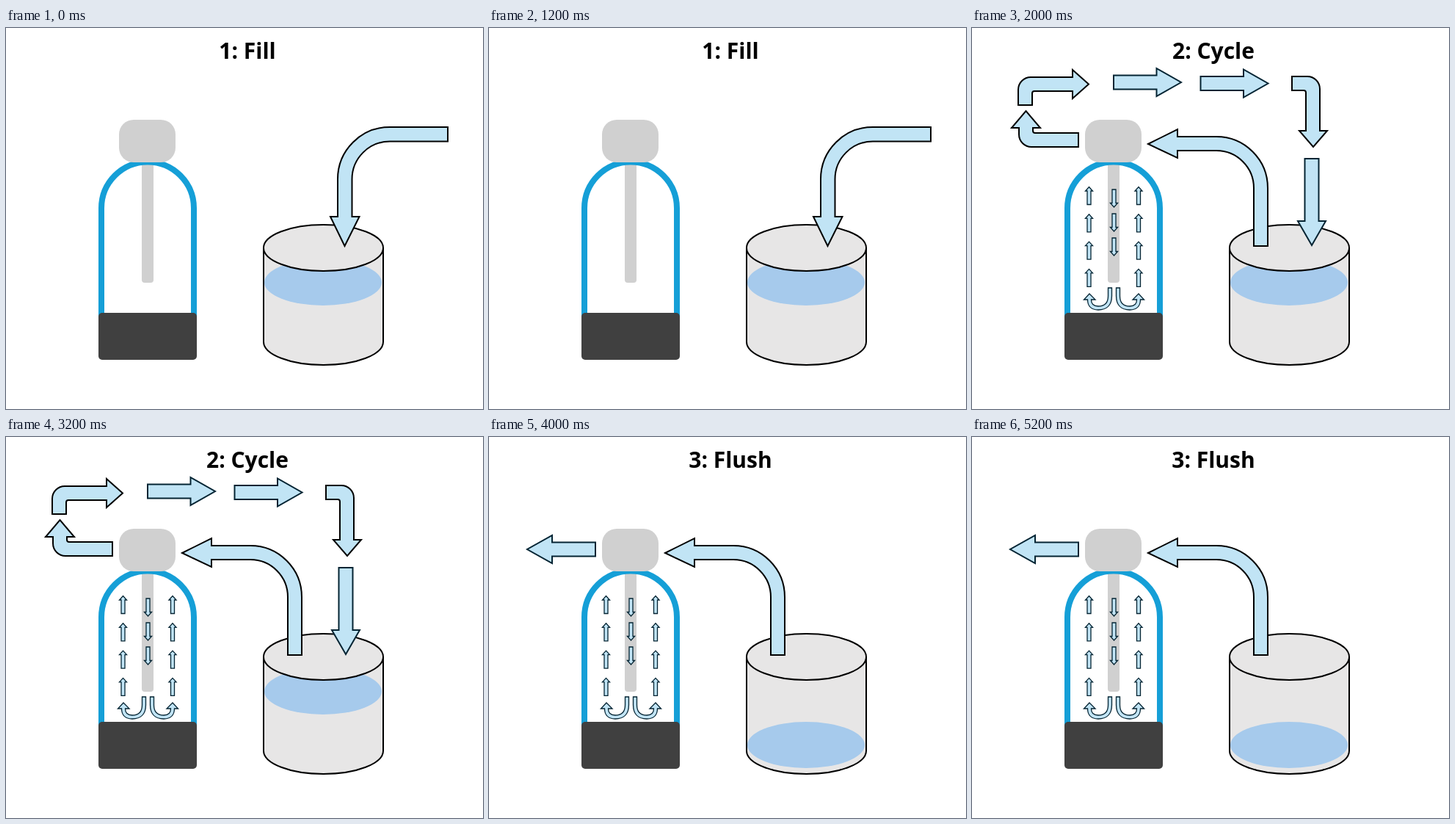
Write an HTML page that moves like this. It is 650x519 px and loops after 6 s.

```html
<!DOCTYPE html>
<html lang="en">
<head>
<meta charset="utf-8">
<style>
  html, body { margin: 0; width: 100%; height: 100%; overflow: hidden; background: #fff; }
  svg { display: block; width: 100%; height: 100%; }
  text { font: bold 30px "Open Sans", "Noto Sans", sans-serif; text-anchor: middle; }
  .arrow { fill: #c1e4f5; stroke: #000; stroke-width: 2; }
  .straight { stroke: #042433; }
  .small { stroke: #042433; stroke-width: 1.3; }
</style>
</head>
<body>
<svg viewBox="0 0 650 519">
  <defs>
    <path id="right" d="M193 64.5H251.500V55L285 74 251.500 93V83.500H193Z"/>
    <path id="up" d="M159.500 216.500L164.500 222H162V240.500H157V222H154.500Z"/>
    <path id="down" d="M191 220H196V238.500H198.500L193.500 244 188.500 238.500H191Z"/>
    <path id="turn" d="M190.500 354V365C190.500 378 183 384 172 384C163 384 157.500 379 157.500 370H152.500L160 362 168 370H162.500C162.500 376 166 379 172 379C180 379 185.500 375 185.500 365V354Z"/>
  </defs>

  <text id="title" x="329" y="42"></text>

  <!-- Bottle -->
  <rect x="185" y="180" width="16" height="167" rx="4" fill="#d0d0d0"/>
  <path d="M130 395V245.500A63 63 0 0 1 256 245.500V395" fill="none" stroke="#159fd7" stroke-width="8"/>
  <rect x="154" y="125" width="77" height="58" rx="20" fill="#d0d0d0"/>
  <rect x="126" y="388" width="134" height="64" rx="5" fill="#404040"/>

  <!-- Tank -->
  <g fill="#e7e6e6" stroke="#000" stroke-width="2">
    <path d="M351 299.500V427.500A81.500 31.500 0 0 0 514 427.500V299.500"/>
    <ellipse id="water" cx="432" rx="80" ry="31.500" fill="#a6caec" stroke="none"/>
    <ellipse cx="432.500" cy="299.500" rx="81.500" ry="31.500"/>
  </g>

  <g class="arrow" data-steps="0">
    <path d="M602 135H523A71 71 0 0 0 452 206V257H442L461.500 297 481.500 257H471.500V206A51.500 51.500 0 0 1 523 154.500H602Z"/>
  </g>

  <g class="arrow" data-steps="12">
    <path d="M240 158L280 138V148H333A70 70 0 0 1 403 218V297H384V218A51 51 0 0 0 333 167H280V177Z"/>
    <g id="flow" class="small">
      <use href="#turn"/>
      <use href="#turn" transform="matrix(-1 0 0 1 387 0)"/>
    </g>
  </g>

  <g class="arrow" data-steps="1">
    <path d="M63 105V84A17 17 0 0 1 80 67H137V57L159 76.500 137 96V86H85A3 3 0 0 0 82 89V105Z"/>
    <path d="M145 143V162H81A17 17 0 0 1 64 145V136H54L73.500 113 93 136H83V140A3 3 0 0 0 86 143Z"/>
    <path d="M436 66H457A17 17 0 0 1 474 83V140H484L465 162 446 140H455V88A3 3 0 0 0 452 85H436Z"/>
    <g class="straight">
      <use href="#right"/>
      <use href="#right" x="118.500" y="1.500"/>
      <path d="M453.500 178H472.500V263H482L463 296 444 263H453.500Z"/>
    </g>
  </g>

  <g class="arrow straight" data-steps="2">
    <path d="M145 143.500V162.500H86V172L52 153 86 134V143.500Z"/>
  </g>
</svg>
<script>
  const STEP_MS = 2000;
  const steps = [
    { title: "1: Fill", water: 346.5 },
    { title: "2: Cycle", water: 346.5 },
    { title: "3: Flush", water: 419.5 }
  ];
  const title = document.getElementById("title");
  const water = document.getElementById("water");
  const flow = document.getElementById("flow");
  const groups = document.querySelectorAll("[data-steps]");

  function addSmall(id, x, y) {
    const use = document.createElementNS("http://www.w3.org/2000/svg", "use");
    use.setAttribute("href", "#" + id);
    use.setAttribute("x", x);
    use.setAttribute("y", y);
    flow.append(use);
  }
  for (let i = 0; i < 4; i++) {
    addSmall("up", 0, i * 37.3);
    addSmall("up", 67.5, i * 37.3);
    if (i < 3) addSmall("down", 0, i * 33);
  }

  let shown = -1;
  function show(index) {
    if (index === shown) return;
    shown = index;
    title.textContent = steps[index].title;
    water.setAttribute("cy", steps[index].water);
    for (const group of groups) {
      group.style.display = group.dataset.steps.includes(index) ? "" : "none";
    }
  }

  const start = performance.now();
  function tick() {
    show(Math.floor((performance.now() - start) / STEP_MS) % steps.length);
    requestAnimationFrame(tick);
  }
  tick();
</script>
</body>
</html>
```
